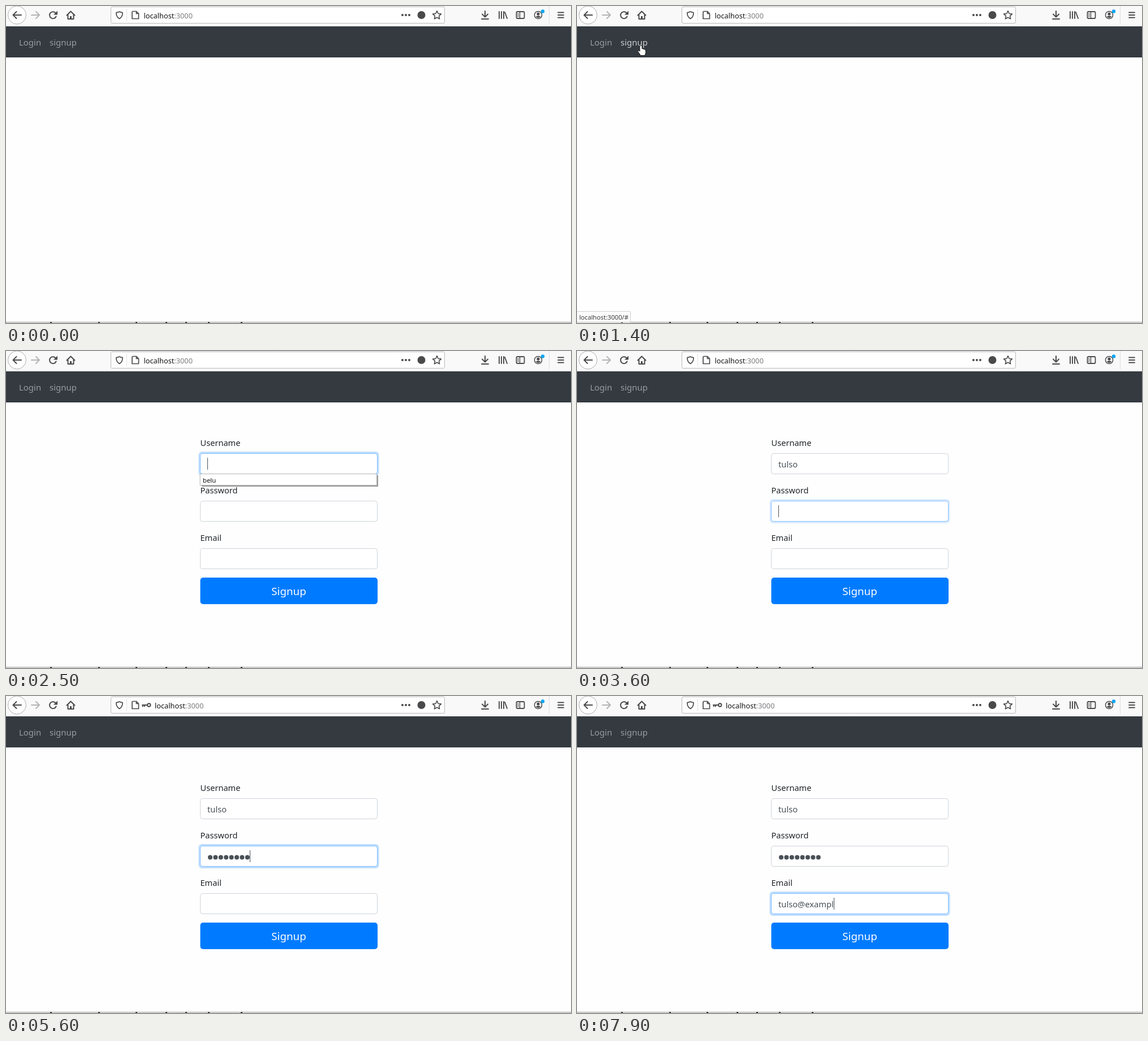
Animation of 999 by 561 pixels, one loop 8000 ms. Source, as an HTML page with a canvas:

```html
<!DOCTYPE html>
<html lang="en">
<head>
<meta charset="utf-8">
<title>Signup form</title>
<style>
html, body { margin: 0; width: 100%; height: 100%; overflow: hidden; background: #fefefe; }
canvas { display: block; }
</style>
</head>
<body>
<canvas id="stage" width="999" height="561"></canvas>
<script>
const c = document.getElementById('stage').getContext('2d');
const LOOP = 8000, STEP = 100;
const INK = '#4a4a4c';
const FONT = '"Noto Sans", "Open Sans", sans-serif';
const USER = 'tulso', MAIL = 'tulso@exampl';

// [time, characters shown]
const userKeys = [[2900, 1], [3000, 2], [3200, 3], [3300, 4], [3400, 5]];
const passKeys = [[4100, 1], [4400, 3], [4500, 4], [4700, 6], [4800, 7], [5000, 8]];
const mailKeys = [[6100, 1], [6400, 2], [6500, 3], [6600, 4], [6700, 5], [7000, 6],
  [7200, 7], [7500, 9], [7600, 10], [7800, 11], [7900, 12]];
// [time, x, y]
const path = [[300, 34, 8], [700, 188, 147], [1000, 113, 70], [1800, 113, 70], [2300, 442, 200]];

const typed = (keys, t) => keys.reduce((n, k) => t >= k[0] ? k[1] : n, 0);
const glow = (t, from, to) => t < from || t >= to ? 0 : Math.min(1, 0.55 + (t - from) / 200);

function rect(x, y, w, h, color) {
  c.fillStyle = color;
  c.fillRect(x, y, w, h);
}

function box(x, y, w, h, r, fill, line) {
  c.beginPath();
  c.roundRect(x, y, w, h, r);
  if (fill) { c.fillStyle = fill; c.fill(); }
  if (line) { c.strokeStyle = line; c.lineWidth = 1; c.stroke(); }
}

function text(s, x, y, size, color, align = 'left') {
  c.font = size + 'px ' + FONT;
  c.textAlign = align;
  c.fillStyle = color;
  c.fillText(s, x, y);
  return c.measureText(s).width;
}

function stroke(d, color = INK, width = 2) {
  c.strokeStyle = color;
  c.lineWidth = width;
  c.stroke(new Path2D(d));
}

function disc(x, y, r, color) {
  c.beginPath();
  c.arc(x, y, r, 0, 7);
  c.fillStyle = color;
  c.fill();
}

function ring(x, y, r, color, width) {
  c.beginPath();
  c.arc(x, y, r, 0, 7);
  c.strokeStyle = color;
  c.lineWidth = width;
  c.stroke();
}

function star(x, y, r) {
  c.beginPath();
  for (let i = 0; i < 10; i++) {
    const a = i * Math.PI / 5 - Math.PI / 2, q = i % 2 ? r * 0.48 : r;
    c.lineTo(x + q * Math.cos(a), y + q * Math.sin(a));
  }
  c.closePath();
  c.strokeStyle = INK;
  c.lineWidth = 1.6;
  c.stroke();
}

function toolbar(hasKey) {
  rect(0, 0, 999, 36, '#f9f9fa');
  c.lineCap = c.lineJoin = 'round';

  disc(19.5, 16, 16, '#fff');
  ring(19.5, 16, 16, '#aeaeb0', 1);
  stroke('M27 16H13M18.5 10L12.5 16L18.5 22');
  stroke('M45 16H58M53 10L59 16L53 22', '#b4b4b6');
  stroke('M88.2 13A6 6 0 1 0 88.6 18.5');
  c.fillStyle = INK;
  c.fill(new Path2D('M91 8.5V15.5H84Z'));
  stroke('M107.5 16.5L114.5 9.5L121.5 16.5M109.5 16V23H119.5V16');
  rect(113, 18, 3, 5, INK);

  box(185.5, 1.5, 590, 29, 2, '#fff', '#b8b8ba');
  stroke('M200.5 10Q203.5 11.5 206 11.5Q206.5 19 200.5 22.5Q194.5 19 195 11.5Q197.5 11.5 200.5 10Z', INK, 1.7);
  c.fill(new Path2D('M200.5 12.8Q202 13.6 203.6 13.7Q203.5 18 200.5 20Z'));
  rect(213, 5, 1, 22, '#e0e0e2');
  stroke('M224 9.5H230.5L234.5 13.5V22.5H223V10.5ZM230.5 9.5V13.5H234.5', INK, 1.7);
  if (hasKey) {
    ring(252.8, 16, 2.7, INK, 1.9);
    stroke('M250 16H241M242 16V18.5M245 16V18.5', INK, 1.9);
  }
  const x = hasKey ? 263 : 243.5;
  const w = text('localhost', x, 22, 12.75, '#141416');
  text(':3000', x + w, 22, 12.75, '#7c7c80');

  for (const dx of [-6, 0, 6]) disc(707 + dx, 16, 2, INK);
  disc(734.5, 16, 7, INK);
  star(762, 16.5, 7.8);

  stroke('M847 9V19M842 14.5L847 19.5L852 14.5M841 23H853');
  stroke('M872 10V22M876 10V22M880 10V22M882 11L886 22', INK, 1.9);
  box(902.5, 10, 14, 12, 2);
  c.strokeStyle = INK; c.lineWidth = 1.8; c.stroke();
  stroke('M908.5 10V22M905 13.5H906M905 16H906M905 18.5H906', INK, 1.4);
  ring(941, 16, 6.6, INK, 1.5);
  disc(941, 14, 2.6, INK);
  c.fill(new Path2D('M936.5 19Q941 15.5 945.5 19Q941 23 936.5 19Z'));
  disc(949, 9.5, 3.2, '#0aa6f5');
  rect(960, 0, 1, 32, '#dedee0');
  stroke('M976 11.5H986M976 16H986M976 20.5H986', INK, 1.8);
}

function input(y, focus) {
  if (focus) box(340.5, y - 3, 319, 43, 6, `rgba(0,123,255,${0.25 * focus})`);
  box(343.5, y + 0.5, 313, 36, 4, '#fff', focus ? '#80bdff' : '#ced4da');
}

function caret(x, y) {
  rect(Math.round(x), y + 8, 1, 21, '#495057');
}

function form(t) {
  const grey = '#495057', dark = '#212529', left = 356, size = 14.7;
  const inUser = glow(t, 2300, 3600), inPass = glow(t, 3600, 5800), inMail = glow(t, 5800, LOOP);
  const user = USER.slice(0, typed(userKeys, t));
  const mail = MAIL.slice(0, typed(mailKeys, t));
  const dots = typed(passKeys, t);

  text('Username', 343.5, 168, 14.6, dark);
  text('Password', 343.5, 252, 14.6, dark);
  text('Email', 343.5, 336, 14.6, dark);
  input(181, inUser);
  input(265, inPass);
  input(349, inMail);

  const userW = text(user, left, 206, size, grey);
  const mailW = text(mail, left, 374, size, grey);
  for (let i = 0; i < dots; i++) disc(361 + i * 9.4, 285.5, 4, grey);
  if (inUser) caret(left + userW, 181);
  if (inPass) caret(left + dots * 9.4, 265);
  if (inMail) caret(left + mailW, 349);

  box(343.5, 401, 313.5, 47, 5, '#007bff');
  text('Signup', 500, 432, 18.8, '#fff', 'center');

  if (t >= 2400 && t < 2900) {
    rect(346, 220, 312, 20, '#9b9b9b');
    box(343.5, 217.5, 312, 20, 0, '#fff', '#b4b4b4');
    text('belu', 348, 233, 11.3, '#111');
  }
}

function pointerAt(t) {
  if (t < path[0][0] || t >= 2300) return null;
  const i = path.findIndex(p => p[0] > t);
  const [t0, x0, y0] = path[i - 1], [t1, x1, y1] = path[i];
  const u = (t - t0) / (t1 - t0), e = u * u * (3 - 2 * u);
  const x = x0 + (x1 - x0) * e, y = y0 + (y1 - y0) * e;
  return x > 343 && y > 181 ? null : { x, y };
}

function pointer(p, hand) {
  const shape = hand
    ? 'M-1.5 1.5Q0 -1 1.5 1.5V6Q3 5 4 6.7Q5.6 6 6.3 7.6Q8 7.4 8 9.5V13Q7.5 15 6.5 17H-.5Q-2 14 -5 10.5Q-4.5 8.5 -1.5 11Z'
    : 'M0 0V16L3.8 12.5L6.2 18L8.6 17L6.2 11.6H11.5Z';
  c.save();
  c.translate(p.x, p.y);
  stroke(shape, '#111', 1.4);
  c.fillStyle = '#fff';
  c.fill(new Path2D(shape));
  c.restore();
}

function draw(t) {
  const p = pointerAt(t);
  const over = p && p.y > 46 && p.y < 87;
  const onLogin = over && p.x > 16 && p.x < 69;
  const onSignup = over && p.x > 69 && p.x < 132;

  rect(0, 0, 999, 561, '#fefefe');
  toolbar(t >= 4100);
  rect(0, 36, 999, 55, '#343a40');
  text('Login', 23, 70, 14.95, onLogin ? '#ccced0' : '#999da0');
  text('signup', 77, 70, 14.95, onSignup ? '#ccced0' : '#999da0');

  if (t >= 1600) form(t);

  rect(0, 559, 999, 1, '#9c9c9c');
  rect(0, 560, 999, 1, '#f2f2f2');
  for (const x of [78, 163, 229, 282, 317, 357, 415]) rect(x, 559, 3, 2, '#333');

  if (t >= 1200 && t < 2000) {
    c.globalAlpha = Math.min(1, (t - 1100) / 300);
    box(-0.5, 540.5, 95, 19, 1, '#fbfbfb', '#cfcfd1');
    text('localhost:3000/#', 4, 555, 11.15, '#3a3a3c');
    c.globalAlpha = 1;
  }
  if (p) pointer(p, onLogin || onSignup);
}

const start = performance.now();
function tick() {
  const t = (performance.now() - start) % LOOP;
  draw(Math.floor(t / STEP) * STEP);
  requestAnimationFrame(tick);
}
tick();
</script>
</body>
</html>
```
